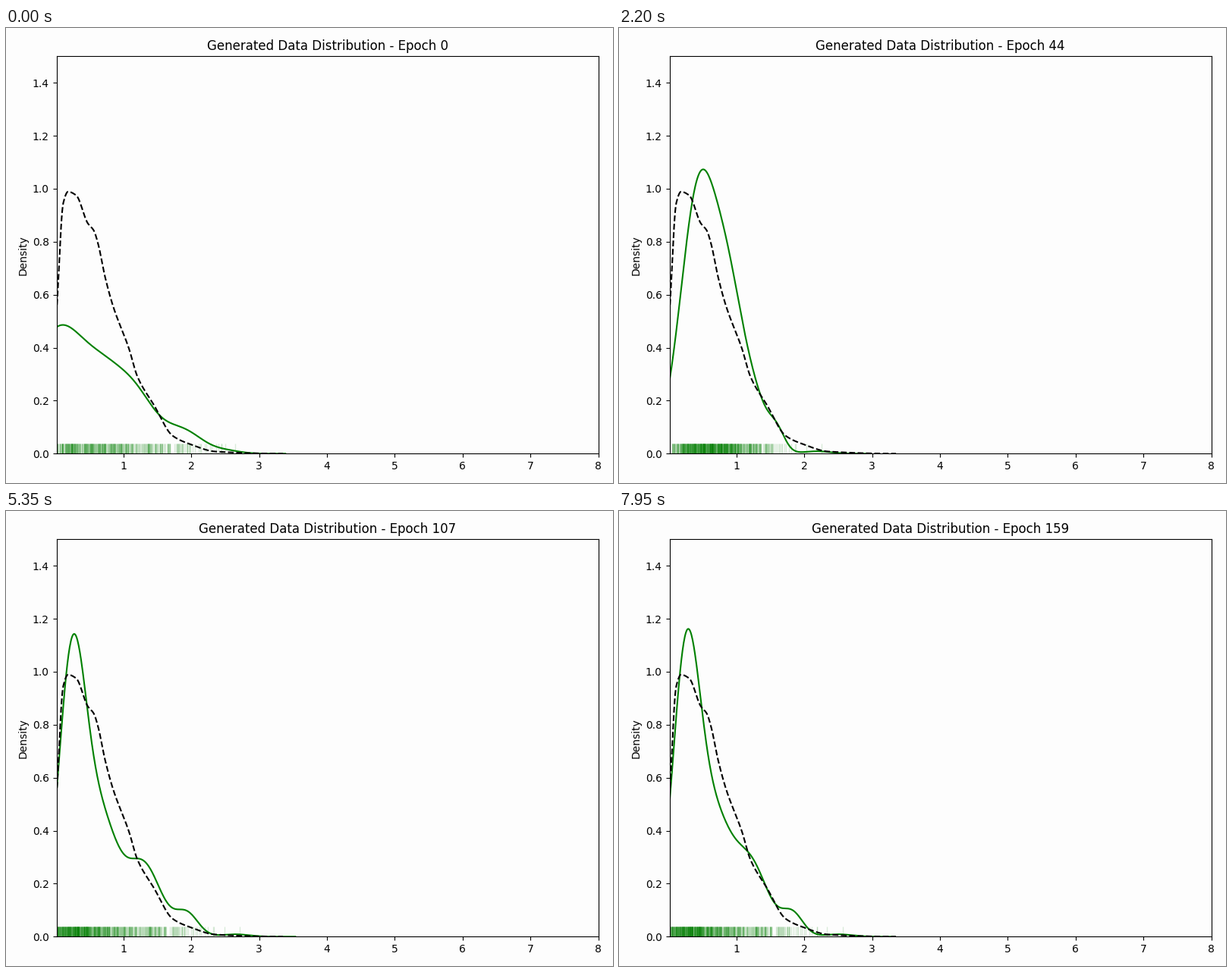
A matplotlib script that plays this animation: 800 by 600 pixels, repeating every 8000 ms.

```python
import numpy as np
import matplotlib.pyplot as plt
from matplotlib.animation import FuncAnimation

EPOCHS = 160
X0 = 0.01
PAPER = "#fdfdfd"
RUG_SIZE = 760
RUG_HEIGHT = 0.025

plt.rcParams["font.family"] = "DejaVu Sans"

# Bell curves (height, centre, width) that add up to the generated density
POSES = {
    0: [(.47, .05, .42), (.20, .75, .30), (.175, 1.20, .28), (.088, 1.85, .30)],
    28: [(.79, .47, .35), (.35, 1.0, .22), (.16, 1.35, .20), (.07, 1.75, .16)],
    61: [(1.15, .40, .207), (.53, .76, .22), (.16, 1.20, .20), (.065, 1.47, .10)],
    80: [(1.16, .24, .19), (.40, .68, .25), (.255, 1.25, .23), (.088, 1.80, .17)],
    107: [(1.03, .24, .20), (.42, .66, .25), (.27, 1.29, .26), (.085, 1.93, .17)],
    159: [(1.04, .255, .20), (.41, .66, .25), (.27, 1.20, .26), (.085, 1.82, .16)],
}

REAL = np.array([
    (.01, .53), (.11, .947), (.18, .989), (.30, .975), (.47, .87), (.56, .842),
    (.625, .79), (.726, .667), (.84, .56), (1.08, .395), (1.2, .293),
    (1.45, .182), (1.72, .068), (2.0, .034), (2.35, .008), (3.35, 0),
])


def smooth(xk, yk, x):
    """Monotone cubic interpolation along the first axis of yk."""
    tail = (1,) * (yk.ndim - 1)
    h = np.diff(xk).reshape(-1, *tail)
    d = np.diff(yk, axis=0) / h
    a, b = d[:-1], d[1:]
    w1, w2 = 2 * h[1:] + h[:-1], h[1:] + 2 * h[:-1]
    same = a * b > 0
    den = np.where(same, w1 * b + w2 * a, 1)
    m = np.zeros_like(yk)
    m[0] = d[0]
    m[1:-1] = np.where(same, (w1 + w2) * a * b / den, 0)
    i = np.clip(np.searchsorted(xk, x, "right") - 1, 0, len(xk) - 2)
    hi = h[i]
    t = (x - xk[i]).reshape(-1, *tail) / hi
    s = 1 - t
    return (s * s * ((1 + 2 * t) * yk[i] + t * hi * m[i])
            + t * t * ((3 - 2 * t) * yk[i + 1] - s * hi * m[i + 1]))


track = smooth(np.array(list(POSES), float), np.array(list(POSES.values())),
               np.arange(EPOCHS, dtype=float))
ranks = np.random.default_rng(4).uniform(size=RUG_SIZE)


def bell(x, height, centre, width):
    return height * np.exp(-0.5 * ((x - centre) / width) ** 2)


def density(epoch):
    bells = track[epoch]
    last = bells[-1, 1]
    x = np.linspace(X0, 1.83 * last, 400)
    y = sum(bell(x, *b) for b in bells)
    return x, y + bell(x, 0.009, 1.37 * last, 0.2)


def rug_lines(x, y):
    # Mass missing from the visible part lies left of the axis
    cdf = np.cumsum(y) * (x[1] - x[0])
    pos = np.interp(ranks, cdf + 1 - cdf[-1], x, left=-1)
    return [((p, 0), (p, RUG_HEIGHT)) for p in pos]


fig, ax = plt.subplots(figsize=(8, 6), dpi=100, facecolor=PAPER)
ax.set_facecolor(PAPER)
rug = ax.vlines(np.ones(2), 0, RUG_HEIGHT, color="green", lw=1, alpha=0.14,
                transform=ax.get_xaxis_transform())
line, = ax.plot([], [], color="green", lw=1.5)
real_x = np.linspace(X0, REAL[-1, 0], 400)
ax.plot(real_x, smooth(REAL[:, 0], REAL[:, 1], real_x), "k--", lw=1.5)
ax.set_xlim(X0, 8)
ax.set_ylim(0, 1.5)
ax.set_xticks(range(1, 9))
ax.set_yticks(np.arange(0, 1.5, 0.2))
ax.set_ylabel("Density")
title = ax.set_title("Generated Data Distribution - Epoch 0")
fig.tight_layout(rect=(0.0004, 0, 1, 1))


def update(epoch):
    x, y = density(epoch)
    line.set_data(x, y)
    rug.set_segments(rug_lines(x, y))
    title.set_text(f"Generated Data Distribution - Epoch {epoch}")
    return line, rug, title


anim = FuncAnimation(fig, update, frames=EPOCHS, interval=50,
                     repeat=True, repeat_delay=0, blit=False)
plt.show()
```
